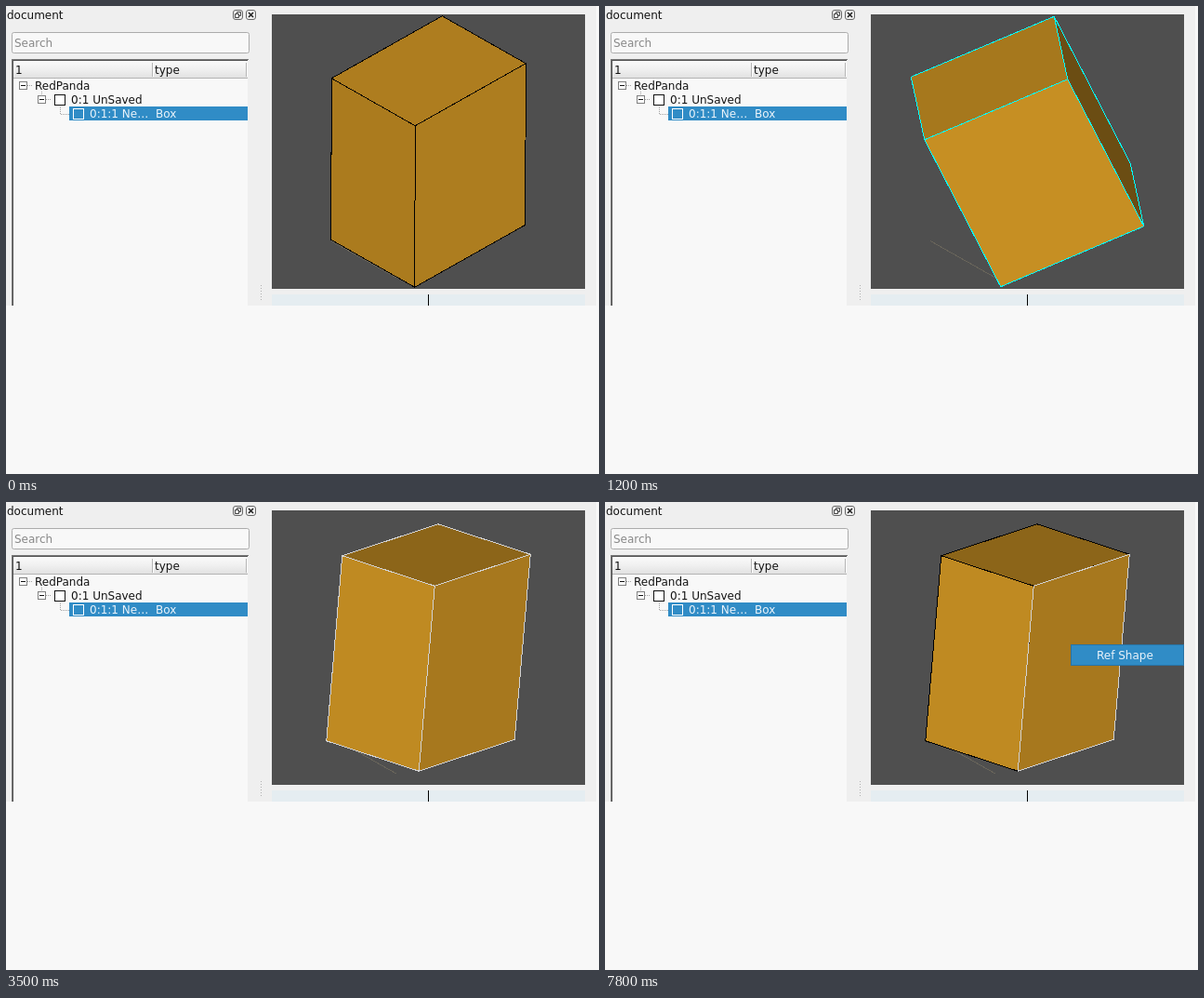
An HTML page that plays this animation: 638x503 px, repeating every 8 s.

```html
<!DOCTYPE html>
<html lang="en">
<head>
<meta charset="utf-8">
<title>Box in a document viewer</title>
<style>
  html, body { margin: 0; width: 100%; height: 100%; overflow: hidden; background: #f8f8f8; }
  svg { display: block; }
  text { font: 12px "DejaVu Sans", sans-serif; fill: #141414; white-space: pre; }
  .crisp { shape-rendering: crispEdges; }
  .light { fill: #eaf3fa; }
  .dots { stroke: #a0a0a0; stroke-dasharray: 1 1; fill: none; }
</style>
</head>
<body>
<svg width="638" height="503" viewBox="0 0 638 503">
  <defs>
    <linearGradient id="head" x2="0" y2="1">
      <stop offset="0" stop-color="#fafafa"/>
      <stop offset=".5" stop-color="#f0f0f0"/>
      <stop offset="1" stop-color="#e2e2e2"/>
    </linearGradient>
  </defs>
  <rect width="635" height="322" fill="#efefef"/>

  <!-- dock title -->
  <text x="1" y="14">document</text>
  <g fill="none" stroke="#444">
    <rect x="244.5" y="4.5" width="10" height="10" rx="2.5" stroke="#666"/>
    <path d="M248.500 8.500V6.500H252.500V10.500H250.500M246.500 8.500H250.500V12.500H246.500Z"/>
    <rect x="258.500" y="4.500" width="10" height="10" rx="2.500" stroke="#666"/>
    <path d="M261 7L266 12M266 7L261 12" stroke-width="1.600" stroke="#222"/>
  </g>

  <!-- search field -->
  <rect x="6.500" y="28.500" width="255" height="22" rx="2" fill="#f8f8f8" stroke="#acacac"/>
  <text x="9" y="44" style="fill:#888">Search</text>

  <!-- tree -->
  <g class="crisp">
    <rect x="7" y="58" width="253" height="264" fill="#f8f8f8"/>
    <rect x="8" y="59" width="252" height="18" fill="url(#head)"/>
    <path d="M6.500 322V57.500H261" fill="none" stroke="#777"/>
    <path d="M7.500 322V58.500H260" fill="none" stroke="#555"/>
    <path d="M8 77.500H260M157.500 61V76M258.500 61V76" stroke="#b4b4b4"/>
    <path d="M158.500 61V76M259.500 61V76" stroke="#fff"/>
    <rect x="68" y="108" width="192" height="15" fill="#308cc6"/>
    <path class="dots" d="M23 85.500H29M38.500 92V96M43 100.500H49M58.500 109V116.500H68"/>
    <g fill="#fff" stroke="#808080">
      <rect x="14.500" y="81.500" width="8" height="8"/>
      <rect x="34.500" y="96.500" width="8" height="8"/>
    </g>
    <path d="M16 85.500H21M36 100.500H41" stroke="#111"/>
    <rect x="52.500" y="95.500" width="11" height="11" fill="#fff" stroke="#111"/>
    <rect x="72.500" y="110.500" width="11" height="11" fill="none" stroke="#fff"/>
  </g>
  <text x="10" y="73">1</text>
  <text x="160" y="73">type</text>
  <text x="31" y="90">RedPanda</text>
  <text x="70" y="105">0:1 UnSaved</text>
  <text x="90" y="120" class="light">0:1:1 Ne…</text>
  <text x="161" y="120" class="light">Box</text>

  <!-- splitter, view, timeline -->
  <g class="crisp">
    <path d="M274.500 300V318" stroke="#b0b0b0" stroke-dasharray="1 2"/>
    <rect x="286" y="9" width="337" height="295" fill="#4f4f4f"/>
    <rect x="286" y="310" width="337" height="12" fill="#e5edf1"/>
    <rect x="454" y="310" width="1" height="12" fill="#000"/>
    <path d="M350 252.500L420 292" stroke="#68645a"/>
  </g>

  <g id="box" class="crisp" stroke-width="1"></g>

  <g id="menu" visibility="hidden">
    <rect class="crisp" x="501.500" y="153.500" width="121" height="22" fill="#308cc6" stroke="#2873a4"/>
    <text x="529" y="169" class="light">Ref Shape</text>
  </g>
</svg>
<script>
const LOOP = 8000, STEP = 100;
const CENTER = [454.5, 156.5];
const SIZE = [168, 127, 210];
const HOVER = '#00ffff', PICKED = '#d2d2d2', PLAIN = '#000';

// Projected box edges a, b, c and the shade of the face across each axis.
const poses = [
  { at: 800,  edges: [[119, -67], [-90, -51], [-0.5, 173.5]],   shade: [171, 173, 174] },
  { at: 900,  edges: [[124, -74], [-85.5, -56], [5.5, 164]],    shade: [162, 171, 176] },
  { at: 1200, edges: [[154, -65], [-14.5, -67.5], [82, 158]],   shade: [107, 198, 166] },
  { at: 1400, edges: [[98.5, 32.5], [104, -34], [-16.5, 199]],  shade: [189, 0, 0] },
  { at: 1500, edges: [[99.5, 32.5], [103, -34], [-17, 199]],    shade: [167, 191, 140] }
];
poses[3].shade = poses[4].shade;

// Time, edge colour, then an optional face axis with its own colour.
const looks = [
  [0, PLAIN],
  [500, HOVER],
  [1500, PICKED],
  [1700, PICKED, 0, HOVER],
  [2100, PICKED, 1, HOVER],
  [2400, PICKED, 0, HOVER],
  [3100, PICKED],
  [4500, HOVER],
  [6000, PICKED],
  [6900, PLAIN, 0, PICKED]
];
const MENU_AT = 7800;

const group = document.getElementById('box');
const menu = document.getElementById('menu');
const polygon = () => group.appendChild(
  document.createElementNS('http://www.w3.org/2000/svg', 'polygon'));
const faces = [0, 1, 2].map(polygon);
const outline = polygon();
outline.setAttribute('fill', 'none');

const mix = (p, q, k) => p + (q - p) * k;
const cross = (p, q) => p[0] * q[1] - p[1] * q[0];

function poseAt(t) {
  const last = poses.length - 1;
  if (t <= poses[0].at) return poses[0];
  if (t >= poses[last].at) return poses[last];
  const i = poses.findIndex(p => p.at > t) - 1;
  const p = poses[i], q = poses[i + 1], k = (t - p.at) / (q.at - p.at);
  if (!k) return p;
  const edges = p.edges.map((e, n) => e.map((v, d) => mix(v, q.edges[n][d], k)));
  // Keep the solid's size while it turns.
  for (const d of [0, 1]) {
    const len = Math.hypot(...edges.map((e, n) => e[d] / SIZE[n]));
    edges.forEach(e => { e[d] /= len; });
  }
  return { edges, shade: p.shade.map((s, n) => mix(s, q.shade[n], k)) };
}

function corners(edges, axis) {
  const u = edges[(axis + 1) % 3], v = edges[(axis + 2) % 3];
  const side = Math.sign(cross(u, v));
  return [[-1, -1], [1, -1], [1, 1], [-1, 1]].map(([m, n]) =>
    CENTER.map((c, d) => (c + (side * edges[axis][d] + m * u[d] + n * v[d]) / 2).toFixed(2))
  ).join(' ');
}

function draw(time) {
  const t = Math.floor(time % LOOP / STEP) * STEP;
  const { edges, shade } = poseAt(t);
  const [, color, axis, accent] = looks.filter(l => l[0] <= t).pop();
  faces.forEach((face, n) => {
    const s = shade[n];
    face.setAttribute('points', corners(edges, n));
    face.setAttribute('fill', `rgb(${[s, s * 0.72, s * 0.177].map(Math.round)})`);
    face.setAttribute('stroke', color);
  });
  outline.setAttribute('points', accent ? corners(edges, axis) : '');
  outline.setAttribute('stroke', accent || 'none');
  menu.setAttribute('visibility', t >= MENU_AT ? 'visible' : 'hidden');
}

const start = performance.now();
function tick() {
  draw(performance.now() - start);
  requestAnimationFrame(tick);
}
tick();
</script>
</body>
</html>
```
